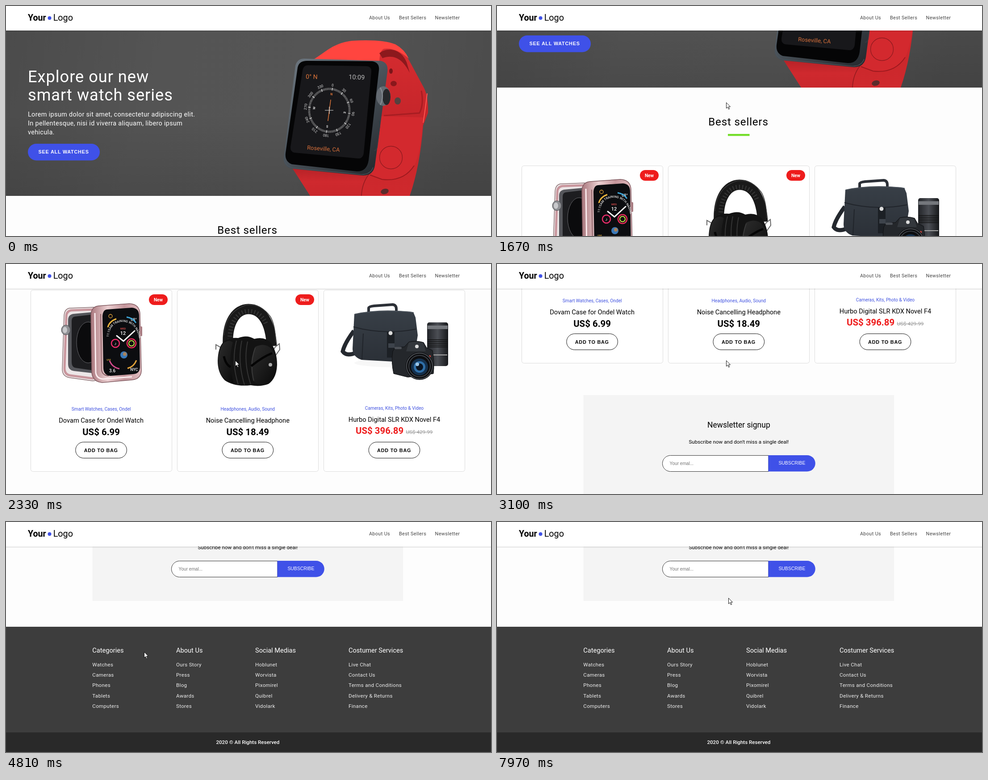
Recreate the animation shown at these times as an HTML page. Size 1086 px wide and 516 px high, loop 8000 ms.

```html
<!DOCTYPE html>
<html lang="en">
<head>
<meta charset="utf-8">
<title>Watch shop</title>
<style>
html, body { margin: 0; width: 100%; height: 100%; overflow: hidden; background: #fdfdfd; }
svg { display: block; font-family: Roboto, sans-serif; }
.button { font: bold 10.86px "Liberation Sans", Arial, sans-serif; letter-spacing: .754px; }
.form { font-family: "Liberation Sans", Arial, sans-serif; }
.nav { font-size: 10.86px; letter-spacing: .36px; fill: #444; }
.title { font-size: 36.2px; letter-spacing: .97px; fill: #fff; }
.lead { font-size: 14.45px; letter-spacing: .335px; fill: #fff; }
.category { font-size: 10.2px; fill: #3f51e0; }
.name { font-size: 14.6px; }
.price { font-size: 20.4px; font-weight: 700; }
.link { font-size: 11.6px; letter-spacing: .3px; fill: #eee; }
.link.hover { fill: #3f51e8; }
.mid { text-anchor: middle; }
</style>
</head>
<body>
<svg id="stage" width="1086" height="516" viewBox="0 0 1086 516"></svg>
<script>
const BLUE = '#3f51e8', RED = '#ee1c1c';

const text = (x, y, str, cls = '', attrs = '') =>
  `<text x="${x}" y="${y}" class="${cls}" ${attrs}>${str}</text>`;
const rect = (x, y, w, h, fill, attrs = '') =>
  `<rect x="${x}" y="${y}" width="${w}" height="${h}" fill="${fill}" ${attrs}/>`;
const path = (d, fill, attrs = '') => `<path d="${d}" fill="${fill}" ${attrs}/>`;
const line = (d, color, width, attrs = '') =>
  path(d, 'none', `stroke="${color}" stroke-width="${width}" ${attrs}`);
const disc = (x, y, r, fill, ry = r, attrs = '') =>
  `<ellipse cx="${x}" cy="${y}" rx="${r}" ry="${ry}" fill="${fill}" ${attrs}/>`;
const ring = (x, y, r, color, width) =>
  disc(x, y, r, 'none', r, `stroke="${color}" stroke-width="${width}"`);

const gradient = (id, dir, ...colors) => `<linearGradient id="${id}" ${dir}>` +
  colors.map((c, i) => `<stop offset="${i / (colors.length - 1)}" stop-color="${c}"/>`).join('') +
  '</linearGradient>';

const defs = `<defs>
  ${gradient('wall', 'x2="1" y2=".1"', '#4b4b4b', '#545454', '#555555', '#4c4c4c')}
  ${gradient('floor', 'x2="0" y2="1"', 'rgba(0,0,0,0)', 'rgba(0,0,0,0)', 'rgba(0,0,0,.12)')}
  ${gradient('band', 'x2="0" y2="1"', '#d62c30', '#c5252a', '#cf292d')}
  ${gradient('front', 'x2="0" y2="1"', '#b52227', '#cf292e', '#c9272c')}
  ${gradient('metal', 'x2=".8" y2="1"', '#6f7982', '#4c555d', '#262b30')}
  ${gradient('pink', 'x2="1" y2="0"', '#a9777d', '#ecd0d2', '#c4959b', '#e2bdc1')}
  ${gradient('cup', 'x2="1" y2="1"', '#2c2c2c', '#1c1c1c', '#090909')}
  ${gradient('tube', 'x2="1" y2="0"', '#222428', '#4b4e54', '#17181b')}
  ${gradient('cloth', 'x2="0" y2="1"', '#383f47', '#2b3037')}
  <path id="dialArc" d="M230 164 Q233 131 262 130 Q292 131 299 172"/>
</defs>`;

function compass() {
  let labels = '';
  for (let a = 0; a < 360; a += 30)
    labels += text(0, -54, a, 'mid', `transform="rotate(${a})" font-size="8.5" fill="#d8d8d8"`);
  const letters = ['N', 'E', 'S', 'W'].map((c, i) =>
    text(0, -34, c, 'mid', `transform="rotate(${i * 90})" font-size="7.5" font-weight="700" fill="${i ? '#ddd' : '#e0763a'}"`)).join('');
  return `<g transform="translate(724 234) scale(.94 1) rotate(8)">${labels}${letters}
    <circle r="48" fill="none" stroke="#aaa" stroke-width="5" stroke-dasharray="1 1.513"/>
    <circle r="48" fill="none" stroke="#eee" stroke-width="6" stroke-dasharray="1.4 23.733" stroke-dashoffset=".7"/>
    ${line('M0-24V24', '#e0763a', 1.6)}</g>${line('M714 234h19M724 226v16', '#ddd', 1.2)}`;
}

const heroWatch =
  path('M832 88C868 78 890 96 907 130L936 184Q946 204 945 240L934 268Q927 360 904 426H795L800 370L840 240Z', 'url(#band)') +
  path('M690 119C716 104 730 84 775 78Q842 74 872 86Q892 97 902 118Q872 92 846 96Q836 100 836 128Z', '#ff453f') +
  path('M836 106C852 92 884 94 897 126L904 150C888 118 868 108 843 117Z', '#8c191d') +
  disc(862, 146, 4, '#7c1519', 6) + disc(868, 174, 7, '#8a181c', 6) + disc(877, 213, 7, '#54413f', 8) +
  line('M930 190Q936 220 926 240L846 246', '#a71d22', 3) +
  line('M943 196Q940 225 934 262', '#ff5550', 2) +
  path('M838 247L934 250Q930 330 913 360Q888 396 842 389L806 375Z', '#d3292e') +
  line('M914 358Q890 395 842 389L815 379', '#9c191e', 2) +
  ring(862, 340, 25.5, '#8f1a1f', 1.3) +
  disc(848, 416, 9, '#5b2b2b', 6, 'transform="rotate(-15 848 416)"') +
  path('M640 362L681 426H796Q797 396 814 374Z', 'url(#front)') +
  line('M796 426Q797 396 814 376', '#8f1a1e', 1.5) +
  path('M668 118L838 123Q857 126 854 148L826 358Q822 382 796 380L640 365Q619 360 622 338L648 134Q652 118 668 118Z', 'url(#metal)') +
  line('M624 346Q626 360 642 363L796 378Q816 378 822 362', '#4d565e', 1.2) +
  path('M674 123L820 124Q837 127 835 144L812 346Q808 372 785 371L640 355Q624 349 626 330L653 138Q656 123 674 123Z', '#050506') +
  path('M676 133L808 135Q819 136 818 148L801 330Q799 343 788 342L646 329Q636 327 637 316L664 145Q666 133 676 133Z', '#18181b') +
  disc(845, 202, 16, '#646a71', 22) + disc(852, 204, 9, '#25272a', 18) +
  line('M838 183Q848 202 838 222', '#8b9299', 2) +
  line('M833 258Q838 258 837 268L831 317Q829 325 824 324', '#353b42', 2) +
  compass() +
  text(671, 163, '0° N', '', 'font-size="14" fill="#e0763a" transform="rotate(2 671 163)"') +
  text(767, 164, '10:09', '', 'font-size="14.5" fill="#b9b9b9" transform="rotate(2 767 164)"') +
  text(674, 322, 'Roseville, CA', '', 'font-size="12.8" fill="#d9703a" transform="rotate(4 674 322)"');

const hero = rect(0, 55, 1086, 371, 'url(#wall)') + rect(0, 55, 1086, 371, 'url(#floor)') + heroWatch +
  text(49, 171, 'Explore our new', 'title') + text(49, 212, 'smart watch series', 'title') +
  text(49, 248, 'Lorem ipsum dolor sit amet, consectetur adipiscing elit.', 'lead') +
  text(49, 268, 'In pellentesque, nisi id viverra aliquam, libero ipsum', 'lead') +
  text(49, 288.3, 'vehicula.', 'lead') +
  rect(49, 309, 161, 37.5, BLUE, 'rx="18.7"') + text(72.6, 331.3, 'SEE ALL WATCHES', 'button', 'fill="#fff"');

const tiny = (x, y, str, fill = '#ddd', size = 8) =>
  text(x, y, str, 'mid', `font-size="${size}" font-weight="500" fill="${fill}"`);

const watchCase =
  path('M142 99L196 97Q206 98 206 112V248Q206 264 192 262L142 255Q126 252 126 236L130 116Q131 101 142 99Z', '#ece6e7', 'stroke="#8d7275" stroke-width="1.5"') +
  line('M200 102L146 104Q135 106 135 118L131 234Q131 248 144 250L196 257', '#c9969d', 5) +
  path('M150 112L204 107V246L152 240Q139 238 139 224V126Q139 114 150 112Z', '#55565b') +
  path('M154 118L204 112V240L156 233Q147 232 147 220V128Q147 119 154 118Z', '#1d1d20') +
  disc(184, 176, 26, '#0b0b0d', 46, 'stroke="#66666a"') +
  disc(134, 148, 10, '#8f9094', 11, 'stroke="#4c4c50"') + disc(132, 148, 5, '#c9c9cc', 7) +
  path('M207 94L276 89Q299 90 300 112L303 240Q302 258 282 260L215 266Q193 264 192 242L190 114Q191 96 207 94Z', 'url(#pink)', 'stroke="#80595f" stroke-width="1.5"') +
  line('M199 110L201 244Q203 257 217 258L282 253', '#fbecee', 3) +
  line('M212 112L214 238Q216 250 230 251', '#8b6066', 2) + rect(300, 140, 5, 22, '#a87c82', 'rx="2"') +
  path('M226 102L282 98Q297 99 298 114L300 232Q299 246 285 247L234 251Q219 250 218 234L216 117Q217 103 226 102Z', '#0c0d10') +
  `<text font-size="7" font-weight="500" fill="#e4e4e4"><textPath href="#dialArc">11:15AM TRAINING WITH NADINE</textPath></text>` +
  ring(234, 117, 4, '#e5a53a', 1.3) + tiny(286, 128, '68°', '#eee', 9) +
  line('M228 142Q231 129 247 123', '#e8b23c', 3) + line('M270 119Q284 121 291 132', '#3fa6d8', 3) +
  line('M232 217Q238 232 254 235', '#d44a8c', 3) + line('M272 234Q286 231 292 216', '#e0a23a', 3) +
  tiny(262, 147, 'WED', '#e2504f', 6) + tiny(262, 159, '12', '#fff', 11) +
  ring(245, 178, 9, '#ee2c6c', 2.5) + tiny(245, 182, '♪', '#fff', 10) +
  ring(281, 178, 10, '#ee2c5c', 2.5) + ring(281, 178, 6, '#c8e64a', 2) +
  disc(264, 204, 8, '#3b79b8') + disc(266, 202, 4, '#a9825a') +
  line('M248 161L263 173L288 150', '#fff', 3, 'stroke-linecap="round"') +
  tiny(230, 217, 'UVI', '#e8b23c', 6) + tiny(238, 243, '3.6', '#eee', 10) + tiny(287, 240, 'NYC', '#eee', 9);

const headphones =
  line('M497 184C494 130 516 101 543 101C572 101 592 128 595 184', '#191919', 23) +
  line('M501 170C501 130 519 106 543 106C562 106 576 118 582 134', '#363636', 10, 'stroke-dasharray="2 5"') +
  line('M488 160Q492 106 538 92Q570 88 592 118Q603 136 604 176', '#3a3a3a', 1.5) +
  line('M487 205L482 188L470 181V192M594 200L603 186L612 179L613 192L603 206', '#666', 2) +
  path('M486 176Q498 164 520 166Q540 158 556 168Q580 162 594 178Q607 198 607 226Q606 256 588 269Q570 276 548 272Q512 276 490 261Q474 245 474 217Q475 188 486 176Z', '#131313') +
  path('M486 178Q500 168 508 176Q496 220 510 268Q490 262 480 246Q468 208 486 178Z', 'url(#cup)') +
  line('M516 172Q504 220 520 270M528 172Q518 220 534 271M541 174Q531 220 548 270', '#343434', 2) +
  path('M558 186Q578 176 592 188Q606 206 606 228Q604 258 586 268Q566 274 553 262Q542 224 558 186Z', 'url(#cup)') +
  line('M558 188Q545 225 555 262', '#3f3f3f', 1.5) +
  line('M488 207Q492 226 503 231M549 229Q575 208 596 200', '#050505', 5) +
  disc(592, 226, 4, '#aaa');

const camera =
  disc(880, 222, 100, 'rgba(0,0,0,.03)', 10) +
  line('M779 150Q758 178 754 196Q762 208 784 199', '#24282e', 9) +
  line('M812 109V99Q813 95 824 94L866 91Q874 92 874 101V106', '#2c3037', 6) +
  path('M780 112Q840 99 912 108L917 120L922 160L914 210L868 219L796 215Q776 208 776 190Z', 'url(#cloth)') +
  line('M780 113Q840 101 913 109', '#4b535c', 1.5) +
  line('M778 141Q846 160 918 146M800 156L797 214', '#20242a', 2) +
  rect(853, 152, 17, 58, '#1c2025') + rect(856, 178, 14, 10, '#3d434b') + disc(861, 155, 4.5, '#ddd') +
  rect(943, 131, 47, 98, 'url(#tube)', 'rx="5"') + rect(944, 138, 45, 8, '#74777c') +
  line('M944 170h45M944 174h45M944 178h45M944 182h45M944 186h45', '#111', 1.5) + rect(945, 203, 43, 2, '#a7a7a7') +
  path('M866 196Q869 185 892 186L902 175Q920 171 935 176L942 188L955 194Q960 222 957 246L900 254L868 246Q862 220 866 196Z', '#24272b', 'stroke="#0d0e10"') +
  path('M902 176Q920 172 934 177L940 196H896Z', '#33373c') +
  rect(870, 186, 16, 5, '#4b4f55', 'rx="2"') + disc(920, 185, 4, '#ddd') + disc(949, 207, 2.5, '#b2423c') +
  disc(926, 229, 31, '#0c0d0f') + ring(926, 229, 29, '#5c6066', 1.5) + ring(926, 229, 24, '#3c4046', 2) +
  disc(926, 231, 19, '#15304c') + disc(926, 231, 13, '#2f6fa8') + disc(926, 231, 8, '#0b1522') + disc(921, 225, 4, '#9cc6e6');

const cards = [
  { art: watchCase, tag: true, category: 'Smart Watches, Cases, Ondel', name: 'Dovam Case for Ondel Watch', price: 'US$ 6.99' },
  { art: headphones, tag: true, category: 'Headphones, Audio, Sound', name: 'Noise Cancelling Headphone', price: 'US$ 18.49' },
  { art: camera, category: 'Cameras, Kits, Photo &amp; Video', name: 'Hurbo Digital SLR KDX Novel F4', price: 'US$ 396.89', old: 'US$ 429.99' }
].map((c, i) => {
  const x = 55.5 + 328 * i, mid = 213.1 + 328.2 * i, up = c.old ? 2.3 : 0;
  const price = c.old
    ? text(783, 381, c.price, 'price', `fill="${RED}"`) +
      text(895.5, 381, c.old, '', 'font-size="11.7" fill="#999" text-decoration="line-through"')
    : text(mid, 383.5, c.price, 'price mid');
  return rect(x, 58.5, 316, 407, '#fff', 'rx="5" stroke="#dcdcdc"') + c.art +
    (c.tag ? rect(x + 264.5, 68, 42, 24, RED, 'rx="12"') +
      text(x + 285.5, 83.7, 'New', 'mid', 'font-size="10.2" font-weight="700" fill="#fff"') : '') +
    text(mid, 329 - up, c.category, 'category mid') + text(mid, 356.4 - up, c.name, 'name mid') + price +
    rect(mid - 57.3, 399.5, 114.6, 36, '#fff', 'rx="18" stroke="#111"') +
    text(mid - 38.4, 421.6, 'ADD TO BAG', 'button');
}).join('');

const signup = rect(193.5, 1080, 695.5, 225, '#f4f4f4') +
  text(541.4, 1153, 'Newsletter signup', 'mid', 'font-size="17.5"') +
  text(541.4, 1188.5, "Subscribe now and don't miss a single deal!", 'mid', 'font-size="11.6"') +
  path('M608 1215.5H388.5a18 18 0 0 0 0 36H608Z', '#fff', 'stroke="#333"') +
  path('M607.5 1215H694.5a18.25 18.25 0 0 1 0 36.5H607.5Z', BLUE) +
  text(386.6, 1237, 'Your emal...', 'form', 'font-size="10.1" fill="#757575"') +
  text(630.4, 1236.3, 'SUBSCRIBE', 'form', 'font-size="10.4" fill="#fff"');

const footer = rect(0, 1363, 1086, 237, '#3d3d3d') + rect(0, 1600, 1086, 44, '#292929') + [
  [193.3, 'Categories', 'Watches', 'Cameras', 'Phones', 'Tablets', 'Computers'],
  [381, 'About Us', 'Ours Story', 'Press', 'Blog', 'Awards', 'Stores'],
  [558, 'Social Medias', 'Hoblunet', 'Worvista', 'Pixomirel', 'Quibrel', 'Vidolark'],
  [767, 'Costumer Services', 'Live Chat', 'Contact Us', 'Terms and Conditions', 'Delivery &amp; Returns', 'Finance']
].map(([x, head, ...links]) => text(x, 1420.5, head, 'name', 'fill="#fff"') +
  links.map((l, i) => text(x, 1451.5 + 23.35 * i, l, 'link')).join('')).join('') +
  text(541.4, 1625.5, '2020 © All Rights Reserved', 'mid', 'font-size="11.6" font-weight="500" fill="#fff"');

const header = rect(0, 55, 1086, 3, '#000', 'opacity=".04"') + rect(0, 55, 1086, 2, '#000', 'opacity=".05"') +
  rect(0, 0, 1086, 55, '#fff') +
  text(49, 33, 'Your', '', 'font-size="19.6" font-weight="700"') + disc(97.5, 27, 4, BLUE) +
  text(105.7, 33, 'Logo', '', 'font-size="19.8"') +
  text(812.9, 30.2, 'About Us', 'nav') + text(879.9, 30.2, 'Best Sellers', 'nav') + text(960.6, 30.2, 'Newsletter', 'nav');

const cursorArt = `<g id="cursor">
  <path id="arrow" d="M.5.7V13.5l3-2.8 2.2 5 2-.9-2.2-4.8h4z" fill="#fff" stroke="#000" stroke-width=".9"/>
  <path id="hand" d="M-1.5 1.5a1.5 1.5 0 0 1 3 0V6.5q1.5-.8 2.3.6 1.6-.5 2 .8 1.6-.2 1.7 1.4v3.7l-1.4 3.2v1.6h-7l-1-2-3.6-5q0-2 2-1l2 1.8z" fill="#fff" stroke="#000" stroke-width=".8"/>
</g>`;

const $ = id => document.getElementById(id);
$('stage').innerHTML = defs + `<g id="page">${rect(0, 0, 1086, 1644, '#fdfdfd')}${hero}
  ${text(473.2, 511.3, 'Best sellers', '', 'font-size="24.1" letter-spacing=".85"')}
  ${rect(517, 530, 48.5, 4.5, '#74dd2a')}
  <g transform="translate(0 543)">${cards}</g>${signup}${footer}</g>${header}${cursorArt}`;

const links = [...document.querySelectorAll('.link')];
const STEP = 66.6;

// start time, distance, share of the distance covered after each step
const spin = [.235, .9, 1];
const wheel = [
  [1530, 243, spin], [2060, 243, spin], [2330, 243, spin], [3100, 243, spin],
  [3430, 156, [.22, .75, .987, 1]]
];

// first step, last step, number of steps, end point
const moves = [
  [70, 870, 13, 514, 217], [940, 940, 1, 513, 216], [3830, 4040, 4, 513, 225],
  [4320, 5090, 12, 237, 314], [5150, 5910, 12, 238, 411], [5980, 6040, 2, 240, 417],
  [6110, 6720, 10, 396, 401], [6790, 7550, 12, 427, 262], [7620, 7970, 6, 518, 170]
];

function scrollAt(t) {
  let y = 0;
  for (const [start, dist, parts] of wheel)
    if (t >= start) y += dist * parts[Math.min(parts.length - 1, Math.floor((t - start) / STEP + .01))];
  return Math.round(y);
}

function cursorAt(t) {
  let x = 1003, y = 508;
  for (const [t0, t1, n, endX, endY] of moves) {
    if (t < t0) break;
    const step = n > 1 ? Math.floor((t - t0) / (t1 - t0) * (n - 1) + .01) : 0;
    const p = Math.min(1, (step + 1) / n), e = p * p * (3 - 2 * p);
    x += (endX - x) * e;
    y += (endY - y) * e;
  }
  return [Math.round(x), Math.round(y)];
}

function draw(t) {
  const top = scrollAt(t), [x, y] = cursorAt(t);
  let over = false;
  for (const link of links) {
    const b = link.getBBox(), py = y + top;
    const hit = x >= b.x && x <= b.x + b.width && Math.abs(py - b.y - b.height / 2) < 11.7;
    link.classList.toggle('hover', hit);
    over ||= hit;
  }
  $('page').setAttribute('transform', `translate(0 ${-top})`);
  $('cursor').setAttribute('transform', `translate(${x} ${y})`);
  $('cursor').style.display = t < 70 ? 'none' : '';
  $('arrow').style.display = over ? 'none' : '';
  $('hand').style.display = over ? '' : 'none';
}

const begin = performance.now();
function frame() {
  draw((performance.now() - begin) % 8000);
  requestAnimationFrame(frame);
}
frame();
</script>
</body>
</html>
```
